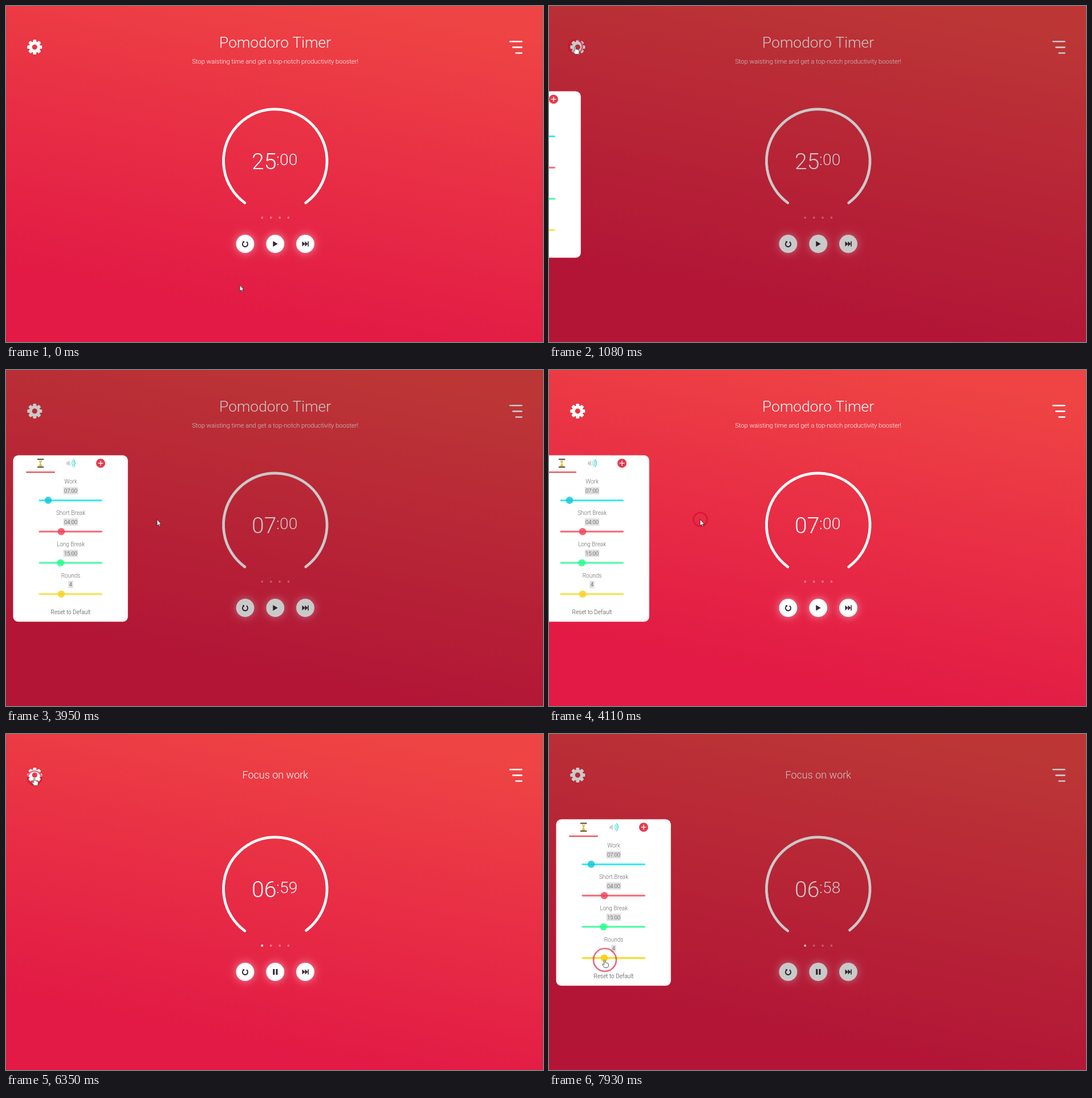
These frames come from a looping animation (942x589 px, 8 s). An HTML page with a canvas:

```html
<!DOCTYPE html>
<html lang="en">
<head>
<meta charset="utf-8">
<title>Pomodoro Timer</title>
<style>
html, body { margin: 0; width: 100%; height: 100%; overflow: hidden; background: #e21945; }
canvas { display: block; width: 942px; height: 589px; }
</style>
</head>
<body>
<canvas id="stage" width="942" height="589"></canvas>
<script>
const W = 942, H = 589, LOOP = 8000, TAU = Math.PI * 2;
const FRAME = 139.4;
const ctx = document.getElementById('stage').getContext('2d');

const OPEN = 1080, GRAB = 2340, DROP = 3210, CLOSE = 4110, PLAY = 5120, REOPEN = 6480;
const TICKS = [5810, 7540];

// Pointer moves: start, end, x, y
const MOVES = [
  [100, 810, 46, 71],
  [1150, 2100, 105, 228],
  [GRAB, 2820, 75, 227],
  [3250, 3700, 265, 262],
  [4300, 4600, 438, 476],
  [4620, 4970, 470, 416],
  [5380, 6000, 49.5, 77],
  [6630, 7800, 97.5, 396]
];
// Mouse button down and up
const PRESSES = [[940, OPEN], [GRAB, DROP], [CLOSE, CLOSE], [PLAY, PLAY + 150], [6200, 6340], [7930, LOOP]];

const ROWS = [
  { name: 'Work', track: '#06e9f6', thumb: '#10c4d8' },
  { name: 'Short Break', value: '04:00', x: 97, track: '#f8465a', thumb: '#f04058' },
  { name: 'Long Break', value: '15:00', x: 95.7, track: '#20f890', thumb: '#20ff88' },
  { name: 'Rounds', value: '4', x: 97, track: '#f8da20', thumb: '#f8d020' }
];
const GEAR = [50.3, 72], BUTTONS = [419.5, 472.3, 525], BUTTON_Y = 417;

const clamp = (v, lo, hi) => Math.min(hi, Math.max(lo, v));
const ease = u => u * u * (3 - 2 * u);
const rowY = i => 228.4 + i * 54.8;
const pad = n => String(n).padStart(2, '0');
const near = (p, x, y, r) => Math.hypot(p.x - x, p.y - y) < r;

function pointerAt(t) {
  let x = 410, y = 489;
  for (const [from, to, tx, ty] of MOVES) {
    const u = ease(clamp((t - from) / (to - from), 0, 1));
    x += (tx - x) * u;
    y += (ty - y) * u;
  }
  return { x, y };
}

function minutesAt(t, p) {
  if (t < GRAB) return 25;
  return t < DROP ? Math.floor((p.x - 62.1) / 1.7) : 7;
}

// Panel offset: 120 px per refresh
function slideAt(t) {
  const opened = t < REOPEN ? OPEN : REOPEN;
  const step = from => Math.floor((t - from) / FRAME);
  if (t < OPEN) return -230;
  if (t >= CLOSE && t < REOPEN) return -38 - 120 * step(CLOSE);
  return Math.min(0, -158 + 120 * step(opened));
}

function rippleAt(t) {
  const press = PRESSES.find(([down, up]) => t >= down && t < up + FRAME);
  return press ? (t < press[1] ? 20 : 12) : 0;
}

function text(str, x, y, size, color, align = 'center') {
  ctx.font = `300 ${size}px Roboto, sans-serif`;
  ctx.textAlign = align;
  ctx.fillStyle = color;
  ctx.fillText(str, x, y);
}
function disc(x, y, r, color) {
  ctx.fillStyle = color;
  ctx.beginPath();
  ctx.arc(x, y, r, 0, TAU);
  ctx.fill();
}
function line(x1, y1, x2, y2, width, color) {
  ctx.strokeStyle = color;
  ctx.lineWidth = width;
  ctx.lineCap = 'round';
  ctx.beginPath();
  ctx.moveTo(x1, y1);
  ctx.lineTo(x2, y2);
  ctx.stroke();
}
function arc(x, y, r, from, to, width, color, cap = 'round') {
  ctx.strokeStyle = color;
  ctx.lineWidth = width;
  ctx.lineCap = cap;
  ctx.beginPath();
  ctx.arc(x, y, r, from, to);
  ctx.stroke();
}
function rect(x, y, w, h, color, r = 0) {
  ctx.fillStyle = color;
  ctx.beginPath();
  ctx.roundRect(x, y, w, h, r);
  ctx.fill();
}
function poly(color, ...pts) {
  ctx.fillStyle = color;
  ctx.beginPath();
  for (let i = 0; i < pts.length; i += 2) ctx.lineTo(pts[i], pts[i + 1]);
  ctx.closePath();
  ctx.fill();
}

const sky = ctx.createLinearGradient(410, H + 15, 532, -15);
sky.addColorStop(0.1, '#e21a45');
sky.addColorStop(0.55, '#e82e45');
sky.addColorStop(1, '#ee4444');

function drawGear() {
  ctx.save();
  ctx.translate(...GEAR);
  for (let i = 0; i < 8; i++) {
    rect(-3, -13, 6, 6, '#fff', 1.6);
    ctx.rotate(TAU / 8);
  }
  arc(0, 0, 7.2, 0, TAU, 5.2, '#fff');
  ctx.restore();
}

function drawMenu() {
  for (let i = 0; i < 3; i++) {
    const y = 62.3 + i * 10.1;
    line(884.2 + i * 5.2, y, 904.6, y, 2.6, '#fff');
  }
}

function drawButtons(running) {
  const ink = '#2a2a2a', y = BUTTON_Y, [a, b, c] = BUTTONS;
  ctx.save();
  ctx.shadowColor = 'rgba(255,255,255,.5)';
  ctx.shadowBlur = 15;
  BUTTONS.forEach(x => disc(x, y, 15.9, '#fff'));
  ctx.restore();
  arc(a, y + 0.4, 4.6, -1.05, Math.PI + 1, 1.9, ink, 'butt');
  poly(ink, a - 5, y - 4.8, a - 1.4, y - 4.8, a - 1.6, y - 1.6);
  if (running) {
    rect(b - 4, y - 5, 3, 10, ink);
    rect(b + 1.2, y - 5, 3, 10, ink);
  } else {
    poly(ink, b - 4, y - 5, b + 4.4, y, b - 4, y + 5);
  }
  [c - 5.5, c - 0.6].forEach(x => poly(ink, x, y - 4.6, x + 5, y, x, y + 4.6));
  rect(c + 4.3, y - 4.6, 1.6, 9.2, ink);
}

function drawScene(t, minutes) {
  ctx.fillStyle = sky;
  ctx.fillRect(0, 0, W, H);
  const running = t >= PLAY + 150;
  const total = minutes * 60;
  const left = total - TICKS.filter(k => k <= t).length;

  drawGear();
  drawMenu();
  if (running) {
    text('Focus on work', 472.3, 78.3, 18, '#fff');
  } else {
    text('Pomodoro Timer', 472.1, 72.8, 26.4, '#fff');
    text('Stop waisting time and get a top-notch productivity booster!', 472.3, 101.3, 11.2, '#fff');
  }

  const start = TAU * 0.35;
  arc(472.3, 271.6, 90.8, start, start + TAU * 0.8 * left / total, 4.7, '#fff');
  text(pad(Math.floor(left / 60)), 430.9, 286.4, 39.2, '#fff', 'left');
  text(':' + pad(left % 60), 474, 279, 28.3, '#fff', 'left');

  for (let i = 0; i < 4; i++) {
    disc(449.3 + i * 15.4, 371, 1.9, running && i === 0 ? '#fff' : 'rgba(255,255,255,.36)');
  }
  drawButtons(running);
}

function drawTabs() {
  // hourglass
  poly('#e9e2c0', 56.5, 157, 64.5, 157, 61.3, 163.5, 64.5, 170, 56.5, 170, 59.7, 163.5);
  poly('#e3bd3c', 57.6, 160, 63.4, 160, 60.9, 163.5, 64, 169.5, 57, 169.5, 60.1, 163.5);
  rect(54.8, 155.6, 11.6, 2, '#4c4a44', 0.6);
  rect(54.8, 169.2, 11.6, 2, '#4c4a44', 0.6);
  rect(35, 177.9, 51, 2.3, '#f04a52', 1);
  // speaker
  poly('#cfd2d2', 106, 161, 108.5, 161, 112, 158.4, 112, 168.4, 108.5, 166, 106, 166);
  for (let i = 0; i < 3; i++) arc(111, 163.4, 4 + i * 3, -0.7, 0.7, 1.4, ['#b5e2e2', '#4cdcdc', '#30d6d8'][i]);
  // add
  disc(166, 163.4, 8, '#e63a4d');
  line(162.2, 163.4, 169.8, 163.4, 1.4, '#fff');
  line(166, 159.6, 166, 167.2, 1.4, '#fff');
}

function overRow(p, i) {
  return p.x > 58 && p.x < 169 && Math.abs(p.y - rowY(i)) < 7;
}

function drawPanel(dx, minutes, p) {
  if (dx < -214) return;
  ctx.save();
  ctx.translate(dx, 0);
  rect(12.5, 149.5, 201.3, 291.8, '#fefffe', 9);
  drawTabs();
  ROWS.forEach((row, i) => {
    const y = rowY(i), value = row.value || pad(minutes) + ':00';
    const x = row.x || 62.1 + 1.7 * minutes;
    const w = value.length > 1 ? 25.5 : 8.5;
    text(row.name, 113.5, y - 29, 10, '#666');
    rect(113.5 - w / 2, y - 23, w, 12.6, '#dedfde');
    text(value, 113.5, y - 13.4, 9.5, '#444');
    ctx.globalAlpha = overRow(p, i) ? 1 : 0.82;
    line(59, y, 167.5, y, 3, row.track);
    disc(x, y, 6.3, row.thumb);
    ctx.globalAlpha = 1;
  });
  text('Reset to Default', 113.5, 428.3, 10, '#444');
  ctx.restore();
}

const ARROW = new Path2D('M0 0 V11.2 L2.6 8.8 L4.2 12.4 L5.9 11.7 L4.3 8.2 H7.4 Z');
const HAND = new Path2D('M-1 1 Q0 -.6 1.1 1 V5 Q2.4 4.2 3.4 5.4 Q4.6 4.8 5.5 6 Q6.8 5.8 6.9 7.2 ' +
  'V10 Q6.8 12 5.4 13.6 H-.4 Q-1.6 11.4 -3.8 8.6 Q-4 6.8 -2.4 7.2 L-1 8.4 Z');

function drawPointer(p, hand) {
  const shape = hand ? HAND : ARROW;
  ctx.save();
  ctx.translate(p.x, p.y);
  ctx.fillStyle = '#fff';
  ctx.strokeStyle = hand ? '#444' : '#3a2228';
  ctx.lineWidth = 0.9;
  ctx.lineJoin = 'round';
  ctx.fill(shape);
  ctx.stroke(shape);
  ctx.restore();
}

function draw(t) {
  const p = pointerAt(Math.floor(t / FRAME) * FRAME);
  const minutes = minutesAt(t, p), dx = slideAt(t), ripple = rippleAt(t);
  const dimmed = (t >= OPEN && t < CLOSE) || t >= REOPEN;

  drawScene(t, minutes);
  if (dimmed) {
    ctx.fillStyle = 'rgba(0,0,0,.21)';
    ctx.fillRect(0, 0, W, H);
  }
  drawPanel(dx, minutes, p);
  if (ripple) arc(p.x + 0.5, p.y, ripple, 0, TAU, 2.7, 'rgba(210,10,42,.6)');

  const hand = near(p, ...GEAR, 14) || BUTTONS.some(x => near(p, x, BUTTON_Y, 16)) ||
    (dx === 0 && ROWS.some((_, i) => overRow(p, i)));
  drawPointer(p, hand);
}

function tick() {
  draw(performance.now() % LOOP);
  requestAnimationFrame(tick);
}
tick();
</script>
</body>
</html>
```
